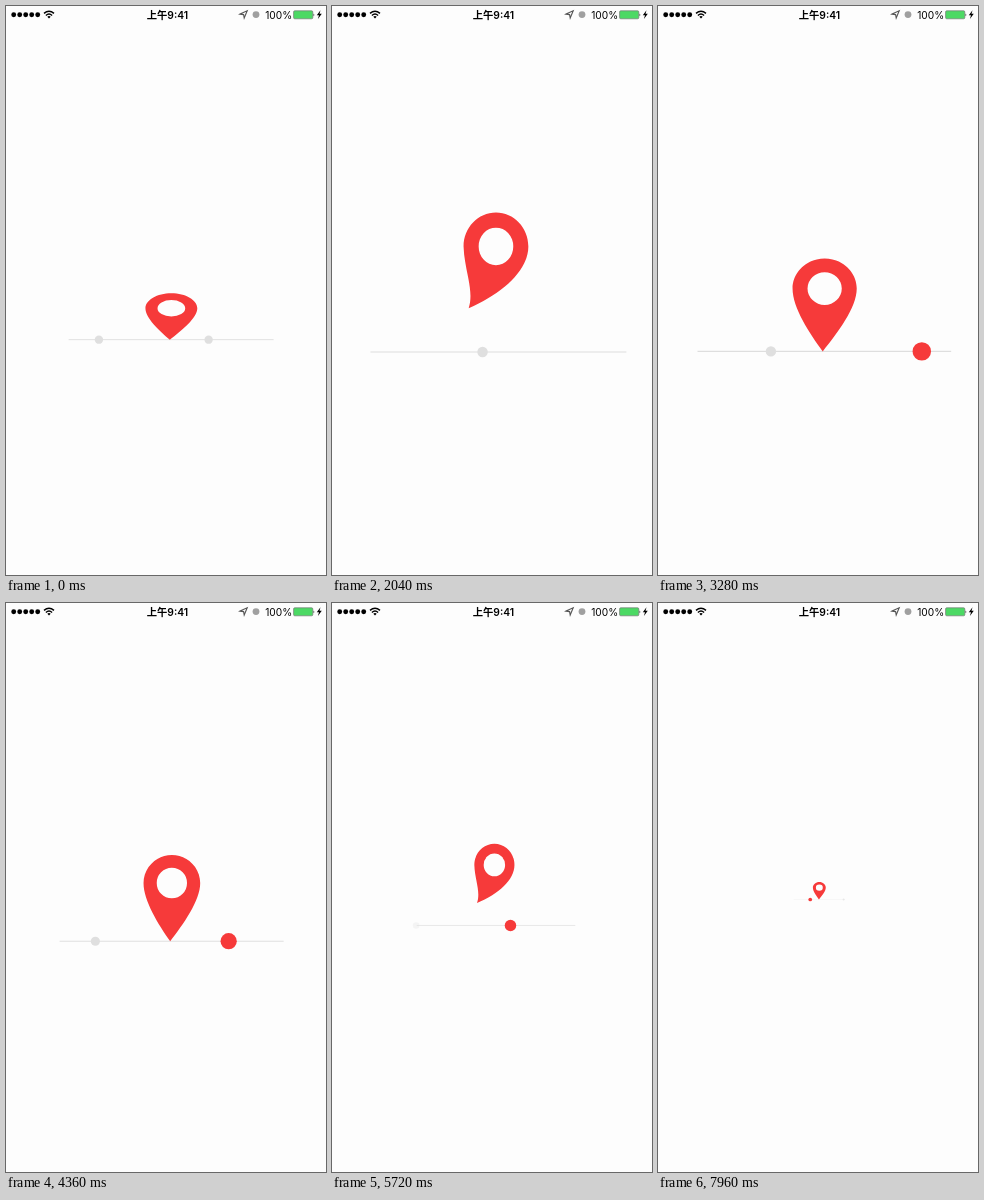
An HTML page that plays this animation: 320x569 px, repeating every 8000 ms.

```html
<!DOCTYPE html>
<html lang="zh">
<head>
<meta charset="utf-8">
<title>Jumping pin</title>
<style>
  html, body { margin: 0; width: 100%; height: 100%; overflow: hidden; background: #fdfdfd; }
  svg { display: block; width: 100%; height: 100%; }
  text { font-family: Inter, "Noto Sans CJK SC", "Noto Sans CJK", sans-serif; fill: #000; }
</style>
</head>
<body>
<svg viewBox="0 0 320 569" xmlns="http://www.w3.org/2000/svg">
  <rect width="320" height="569" fill="#fdfdfd"/>

  <g id="signal"></g>
  <g fill="none" stroke="#000" stroke-width="1.4">
    <path d="M38 7.4Q43 3 48 7.4"/>
    <path d="M39.9 9.4Q43 6.6 46.1 9.4"/>
  </g>
  <path d="M41.3 10.7Q43 9.3 44.7 10.7L43 12.4Z"/>
  <text x="161.4" y="12.6" font-size="10.3" font-weight="600" text-anchor="middle">上午9:41</text>
  <path d="M234 8.1L241.2 4.8L238.2 12L237.6 8.6Z" fill="none" stroke="#555" stroke-width="1.1"/>
  <circle cx="250" cy="8.6" r="3.4" fill="#a0a0a0"/>
  <text x="259.2" y="12.6" font-size="10.2">100%</text>
  <rect x="287.6" y="4.8" width="19.2" height="8" rx="1.2" fill="#4cd964" stroke="#777" stroke-width=".7"/>
  <path d="M307.6 7.4Q309.2 8.8 307.6 10.2Z"/>
  <path d="M314.5 4.2L310.8 9.3H313L311.9 13L315.8 7.8H313.5Z"/>

  <line id="road" stroke="#dedede"/>
  <g id="dots"></g>
  <path id="pin" fill="#f63a3a" fill-rule="evenodd"/>
</svg>
<script>
const LOOP = 8, CX = 160, CY = 284.2;
const RED = '#f63a3a', GRAY = '#dfdfdf';

// Lengths below are fractions of the road width, times are in seconds.
const GROUND = 0.2412, LEFT = -0.475, RIGHT = 0.525;
const SPEED = 0.12;                  // of the dots, to the left
const CYCLE = 4.963;                 // from one jump to the next
const TAKEOFF = 0.3, LANDING = 2.7, JUMP = 0.17;
const MAX_WIDTH = 258, PEAK = 2.7;   // largest road and its time

const $ = id => document.getElementById(id);
const clamp = v => Math.max(0, Math.min(1, v));
const mix = (a, b, k) => a + (b - a) * k;

// Smooth step from 0 at time a to 1 at time b.
function ramp(a, b, t) {
  const s = clamp((t - a) / (b - a));
  return s * s * (3 - 2 * s);
}

const pulse = (a, b, c, d, t) => ramp(a, b, t) * (1 - ramp(c, d, t));

function set(el, attrs) {
  for (const name in attrs) el.setAttribute(name, attrs[name]);
}

function circle(parent, attrs) {
  const el = document.createElementNS('http://www.w3.org/2000/svg', 'circle');
  set(el, attrs);
  return $(parent).appendChild(el);
}

// Eases out to its largest size, then shrinks along a cosine.
function roadWidth(t) {
  return t < PEAK
    ? MAX_WIDTH - 53 * (1 - t / PEAK) ** 2.34
    : MAX_WIDTH - 115 * (1 - Math.cos(.475 * (t - PEAK)));
}

function pinPose(t) {
  const crouch = ramp(4.36, 4.93, t) + 1 - ramp(0, TAKEOFF, t);
  const air = pulse(.1, .5, 2.2, LANDING, t);
  const impact = pulse(2.6, 2.9, 2.9, 3.6, t);
  const bend = pulse(.1, 1, 1.75, 2.75, t);
  const stretch = 1 + .065 * air - .41 * crouch - .11 * impact;
  const arc = 2 * (t - TAKEOFF) / (LANDING - TAKEOFF) - 1;
  const lift = JUMP * Math.max(0, 1 - arc * arc);
  return { bend, stretch, x: .0262 - .0135 * bend, height: .26 * stretch + lift };
}

function pinPath(x, y, w, stretch, bend) {
  const p = (u, v) => `${(x + u * w).toFixed(2)} ${(y + v * w * stretch).toFixed(2)}`;
  const between = (a, b) => p(mix(a[0], b[0], bend), mix(a[1], b[1], bend));
  const r = .1265, top = -.1245, h = .0675, k = .552;
  const tip = between([-.0075, .26], [-.132, .218]);
  const hole = `A${h * w} ${h * w * stretch} 0 1 0 `;
  return `M${p(-r, 0)}C${p(-r, top * k)} ${p(-r * k, top)} ${p(0, top)}`
    + `C${p(r * k, top)} ${p(r, top * k)} ${p(r, 0)}`
    + `C${between([r, .08], [r, .09])} ${between([.05, .185], [.02, .17])} ${tip}`
    + `C${between([-.06, .185], [-.09, .155])} ${between([-r, .08], [-.123, .09])} ${p(-r, 0)}Z`
    + `M${p(-h, 0)}${hole}${p(h, 0)}${hole}${p(-h, 0)}Z`;
}

// The gaps between dots widen a little; every third dot is large and red.
const dots = Array.from({ length: 4 }, (_, i) => {
  const red = i % 3 === 2;
  return {
    start: -.327 + .505 * i + .03 * i * i,
    r: red ? .0363 : .0205,
    el: circle('dots', { fill: red ? RED : GRAY })
  };
});

for (let i = 0; i < 5; i++) circle('signal', { cx: 7.7 + i * 6, cy: 8.7, r: 2.45 });

function draw(t) {
  const w = roadWidth(t), y = CY + GROUND * w;
  set($('road'), { x1: CX + LEFT * w, x2: CX + RIGHT * w, y1: y, y2: y, 'stroke-width': .0043 * w });

  for (const dot of dots) {
    const u = dot.start - SPEED * t;
    const opacity = Math.min(clamp((u + .495) / .06), clamp((.535 - u) / .05));
    set(dot.el, { cx: CX + u * w, cy: y, r: dot.r * w, opacity });
  }

  const pose = pinPose(t % CYCLE);
  set($('pin'), { d: pinPath(CX + pose.x * w, y - pose.height * w, w, pose.stretch, pose.bend) });
}

const begin = performance.now();
function tick() {
  draw((performance.now() - begin) / 1000 % LOOP);
  requestAnimationFrame(tick);
}
tick();
</script>
</body>
</html>
```
